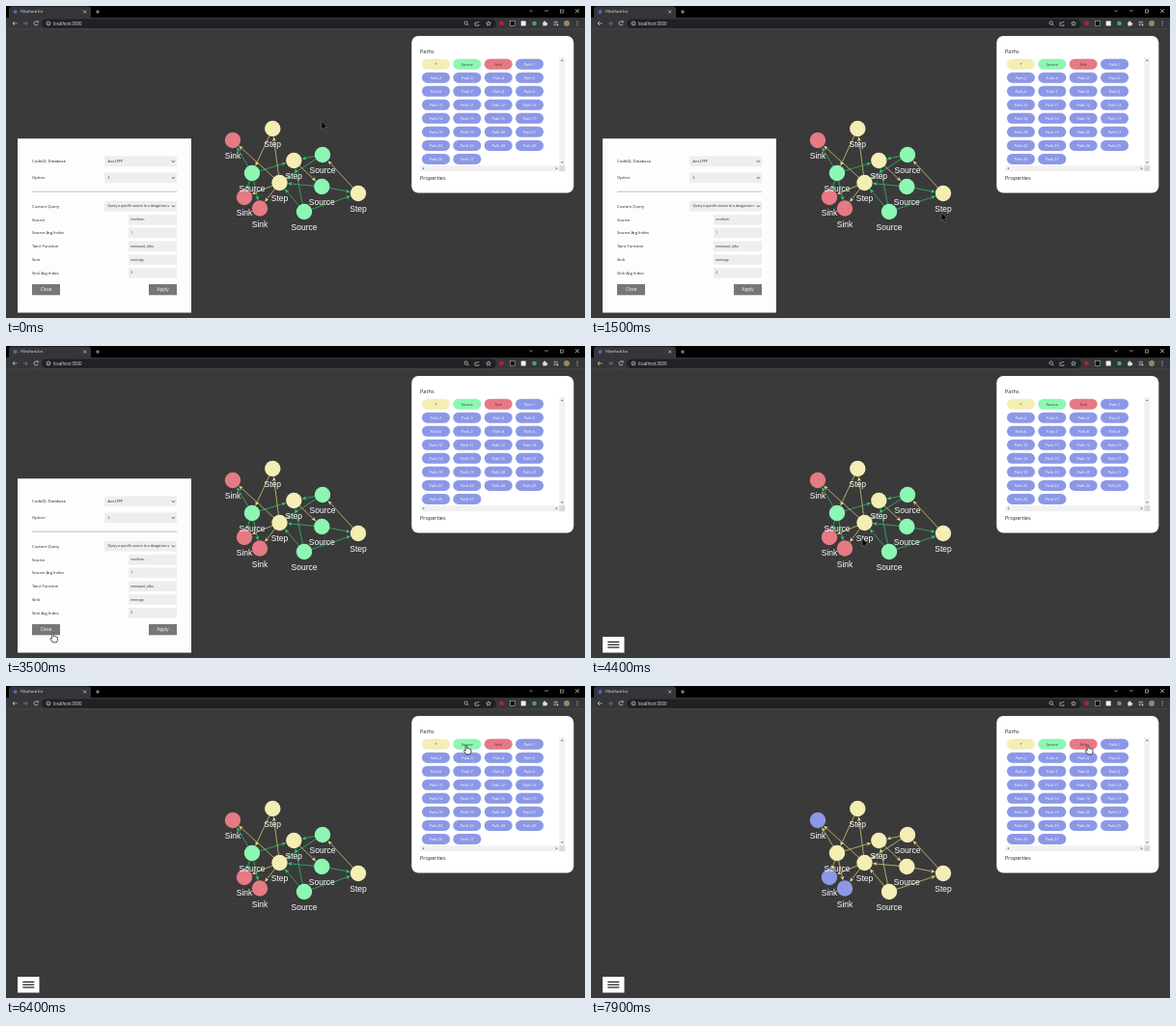
An HTML page with a canvas that plays this animation: 600x323 px, repeating every 8000 ms.

```html
<!DOCTYPE html>
<html lang="en">
<head>
<meta charset="utf-8">
<title>Graph viewer</title>
<style>
html, body { margin: 0; width: 100%; height: 100%; overflow: hidden; background: #3a3a3a; }
canvas { display: block; width: 600px; height: 323px; }
</style>
</head>
<body>
<canvas id="stage"></canvas>
<script>
const W = 600, H = 323, LOOP = 8000;
const CLOSE_AT = 3650, SOURCE_AT = 6700, SINK_AT = 7650;
const YELLOW = '#f4eeb4', GREEN = '#8cf7b2', RED = '#e57a85', BLUE = '#8c98e6';
const UI = '"Open Sans", "Noto Sans", sans-serif';
const LABEL = '"Liberation Sans", Arial, sans-serif';

const canvas = document.getElementById('stage');
const dpr = window.devicePixelRatio || 1;
canvas.width = W * dpr;
canvas.height = H * dpr;
const c = canvas.getContext('2d');

const nodes = {
  a: [276.3, 127, 'Step'], b: [235, 139, 'Sink'], c: [255, 173, 'Source'],
  d: [247, 198, 'Sink'], e: [263, 209.5, 'Sink'], f: [283.5, 183, 'Step'],
  g: [298.3, 160, 'Step'], h: [328, 154, 'Source'], i: [327.3, 187, 'Source'],
  j: [309, 213, 'Source'], k: [365, 194, 'Step']
};
const edges = 'cb cd ce cg fb fd fe fa ac gi hg hf if jf jg jk ik kh'.split(' ');
const fills = { Step: YELLOW, Source: GREEN, Sink: RED };

// time, x, y of the pointer tip
const path = [
  [0, 327, 119], [700, 381, 209], [1300, 381, 209], [2400, 179, 264],
  [2700, 179, 264], [3400, 48.5, 297], [3750, 48.5, 297], [4400, 281, 199],
  [4900, 281, 199], [6300, 477, 61], [6950, 477, 61], [7450, 515, 61], [8000, 515, 61]
];

function rect(x, y, w, h, color, r = 0) {
  c.fillStyle = color;
  c.beginPath();
  c.roundRect(x, y, w, h, r);
  c.fill();
}

function disc(x, y, r, color) {
  c.fillStyle = color;
  c.beginPath();
  c.arc(x, y, r, 0, Math.PI * 2);
  c.fill();
}

function ring(x, y, r, color, from = 0, to = Math.PI * 2) {
  c.strokeStyle = color;
  c.lineWidth = 0.7;
  c.beginPath();
  c.arc(x, y, r, from, to);
  c.stroke();
}

function line(pts, color, width = 0.7) {
  c.strokeStyle = color;
  c.lineWidth = width;
  c.beginPath();
  for (let n = 0; n < pts.length; n += 2) c.lineTo(pts[n], pts[n + 1]);
  c.stroke();
}

function poly(pts, color) {
  c.fillStyle = color;
  c.beginPath();
  for (let n = 0; n < pts.length; n += 2) c.lineTo(pts[n], pts[n + 1]);
  c.closePath();
  c.fill();
}

function text(s, x, y, size, color, align = 'left', font = UI) {
  c.font = `${size}px ${font}`;
  c.fillStyle = color;
  c.textAlign = align;
  c.textBaseline = 'alphabetic';
  c.fillText(s, x, y + size * 0.35);
}

function drawBrowser() {
  rect(0, 0, W, 12, '#000');
  rect(3, 0.5, 85, 12, '#35363a', [3, 3, 0, 0]);
  rect(0, 12, W, 12, '#35363a');
  rect(37, 13.5, 471, 9.5, '#202124', 4.7);
  rect(0, 23.6, W, 0.6, '#4a4a4a');
  disc(9.5, 6, 2, '#5b62b5');
  text('Fl0wHarb3nt', 15, 6, 3.9, '#e4e4e4');

  const ink = '#d5d5d5';
  line([80.3, 4.6, 83.1, 7.4], ink);
  line([83.1, 4.6, 80.3, 7.4], ink);
  line([93, 6, 97, 6], ink);
  line([95, 4, 95, 8], ink);
  line([542.3, 4.2, 544, 5.8, 545.7, 4.2], ink, 0.6);
  line([558, 5, 562, 5], ink, 0.6);
  c.strokeRect(574.3, 4, 3, 3);
  line([590, 3.2, 594, 7], ink);
  line([594, 3.2, 590, 7], ink);

  line([11.5, 18, 7, 18], ink);
  line([9, 16, 7, 18, 9, 20], ink);
  line([18, 18, 22, 18], '#888');
  line([20.3, 16, 22.3, 18, 20.3, 20], '#888');
  ring(31, 18, 2, ink, 0.2, 5.5);
  poly([31.5, 15.4, 33.5, 15.4, 33.5, 17.6], ink);
  ring(44, 18, 2, ink);
  line([44, 17.5, 44, 19.2], ink);
  text('localhost:3000', 49, 18, 4.4, '#ececec');

  ring(476.7, 17.5, 1.7, ink);
  line([478, 18.8, 479.5, 20.3], ink);
  line([487, 17, 486, 17, 486, 20.3, 490, 20.3, 490, 19], ink, 0.6);
  line([487.5, 18.5, 488.5, 16.5, 490.3, 16.5], ink, 0.6);
  c.strokeStyle = ink;
  c.lineWidth = 0.6;
  c.beginPath();
  for (let n = 0; n < 10; n++) {
    const r = n % 2 ? 1.1 : 2.5, a = n * Math.PI / 5 - Math.PI / 2;
    c.lineTo(500 + r * Math.cos(a), 18.2 + r * Math.sin(a));
  }
  c.closePath();
  c.stroke();

  disc(513.5, 18, 2.4, '#b3202c');
  rect(522.5, 15.5, 5, 5, '#111');
  c.strokeStyle = '#aaa';
  c.strokeRect(522.5, 15.5, 5, 5);
  rect(533.7, 15.6, 5, 5, '#f0f0f0', 0.5);
  disc(547.5, 18, 2.3, '#4fa56b');
  rect(556.3, 16.8, 4, 3.7, '#ddd', 0.5);
  disc(558.2, 16.6, 1, '#ddd');
  disc(560.5, 18.6, 0.9, '#ddd');
  for (const y of [16.3, 18, 19.7]) line([567.5, y, y > 19 ? 570 : 572, y], ink, 0.6);
  disc(571.5, 19.6, 0.9, ink);
  disc(581, 18, 3, '#9a855e');
  for (const y of [16, 18, 20]) disc(592, y, 0.55, ink);
}

function field(label, y, value, x, size = 3.4) {
  text(label, 27, y, 4.2, '#222');
  rect(x, y - 5.4, 177 - x, 10.6, '#eee');
  text(value, x + (x < 120 ? 3.5 : 2.2), y - 0.2, size, '#222');
  if (x < 120) line([171.9, y - 0.8, 173.4, y + 0.7, 174.9, y - 0.8], '#222', 0.8);
}

function button(label, x) {
  rect(x, 288, 29, 11.3, '#777');
  text(label, x + 14.5, 293.7, 4.6, '#fff', 'center');
}

function drawForm() {
  rect(12, 137.3, 180, 180.2, '#fdfdfd');
  field('CodeQL Database', 161, 'Accel-PPP', 102);
  field('Option', 178, '2', 102);
  rect(27, 191.8, 150, 0.7, '#aaa');
  field('Custom Query', 207.3, 'Query a specific source to a dangerous s', 102);
  field('Source', 221.2, 'recvfrom', 127);
  field('Source Arg Index', 235, '1', 127);
  field('Taint Function', 248.8, 'mempool_alloc', 127);
  field('Sink', 262.6, 'memcpy', 127);
  field('Sink Arg Index', 276.4, '2', 127);
  button('Close', 27);
  button('Apply', 148);
}

function drawMenu() {
  rect(12, 301, 22.5, 16.5, '#fff');
  for (const y of [306.4, 309.2, 312]) rect(17.3, y - 0.6, 12, 1.2, '#1a1a1a');
}

function drawPaths() {
  rect(420.3, 31, 168, 162.5, '#fff', 7);
  text('Paths', 429, 47, 5.6, '#222');
  text('Properties', 429, 178.3, 5.5, '#222');
  const heads = [['*', YELLOW], ['Source', GREEN], ['Sink', RED]];
  for (let n = 0; n < 30; n++) {
    const x = 431 + (n % 4) * 32.35, y = 60.2 + Math.floor(n / 4) * 14.03;
    const [name, fill] = heads[n] || [`Path-${n - 2}`, BLUE];
    rect(x, y - 5.5, 29, 11, fill, 5.5);
    text(name, x + 14.5, y, 3.8, n < 2 ? '#333' : n < 3 ? '#5a1f2a' : '#fff', 'center');
  }
  rect(573.3, 53, 6, 112.2, '#f1f1f1');
  rect(429.3, 165.2, 144, 6, '#f1f1f1');
  rect(573.3, 165.2, 6, 6, '#d8d8d8');
  const ink = '#777';
  poly([576.3, 55.2, 577.7, 57, 574.9, 57], ink);
  poly([576.3, 163, 577.7, 161.2, 574.9, 161.2], ink);
  poly([431.5, 168.2, 433.2, 166.8, 433.2, 169.6], ink);
  poly([571.5, 168.2, 569.8, 166.8, 569.8, 169.6], ink);
}

function drawGraph(t) {
  const pick = t >= SINK_AT ? 'Sink' : t >= SOURCE_AT ? 'Source' : '';
  for (const [p, q] of edges) {
    const [x1, y1, kind] = nodes[p], [x2, y2] = nodes[q];
    const green = !pick && kind === 'Source';
    const a = Math.atan2(y2 - y1, x2 - x1), ux = Math.cos(a), uy = Math.sin(a);
    const tx = x2 - ux * 8.4, ty = y2 - uy * 8.4;
    const bx = tx - ux * 4.6, by = ty - uy * 4.6;
    line([x1, y1, bx, by], green ? '#2fb868' : '#cfc674', 0.8);
    poly([tx, ty, bx - uy * 1.9, by + ux * 1.9, bx + ux, by + uy, bx + uy * 1.9, by - ux * 1.9],
      green ? '#25d872' : '#e8de7c');
  }
  const all = Object.values(nodes);
  for (const [x, y, kind] of all)
    disc(x, y, 8.2, !pick ? fills[kind] : kind === pick ? BLUE : YELLOW);
  for (const [x, y, kind] of all) text(kind, x, y + 16.4, 8.5, '#fff', 'center', LABEL);
}

function pointerAt(t) {
  let n = 1;
  while (n < path.length - 1 && t > path[n][0]) n++;
  const [t0, x0, y0] = path[n - 1], [t1, x1, y1] = path[n];
  const u = (t - t0) / (t1 - t0), s = u * u * (3 - 2 * u);
  return [x0 + (x1 - x0) * s, y0 + (y1 - y0) * s];
}

function overButton(x, y, t) {
  const inside = (l, top, w, h) => x >= l && x <= l + w && y >= top && y <= top + h;
  if (t < CLOSE_AT && inside(27, 288, 29, 11.3)) return true;
  for (let n = 0; n < 30; n++)
    if (inside(431 + (n % 4) * 32.35, 54.7 + Math.floor(n / 4) * 14.03, 29, 11)) return true;
  return false;
}

const arrow = new Path2D('M0 0V8.6L1.9 6.9L3.2 9.8L4.5 9.2L3.3 6.4H5.9Z');
const hand = new Path2D('M-.8 .7Q0-.5.8.7V3.6Q1.8 3 2.3 3.9Q3.2 3.4 3.7 4.3Q4.9 4 5 5.2V7.3L4.1 9.8H-.2L-2.6 6.3Q-2.7 5-.8 6Z');

function drawPointer(t) {
  const [x, y] = pointerAt(t), over = overButton(x, y, t);
  c.save();
  c.translate(x, y);
  c.lineWidth = over ? 0.7 : 0.4;
  c.lineJoin = 'round';
  c.fillStyle = over ? '#fff' : '#000';
  c.strokeStyle = over ? '#111' : '#999';
  const shape = over ? hand : arrow;
  c.fill(shape);
  c.stroke(shape);
  c.restore();
}

function frame() {
  const t = performance.now() % LOOP;
  c.setTransform(dpr, 0, 0, dpr, 0, 0);
  rect(0, 0, W, H, '#3a3a3a');
  drawBrowser();
  drawGraph(t);
  if (t < CLOSE_AT) drawForm();
  else drawMenu();
  drawPaths();
  drawPointer(t);
  requestAnimationFrame(frame);
}
frame();
</script>
</body>
</html>
```
